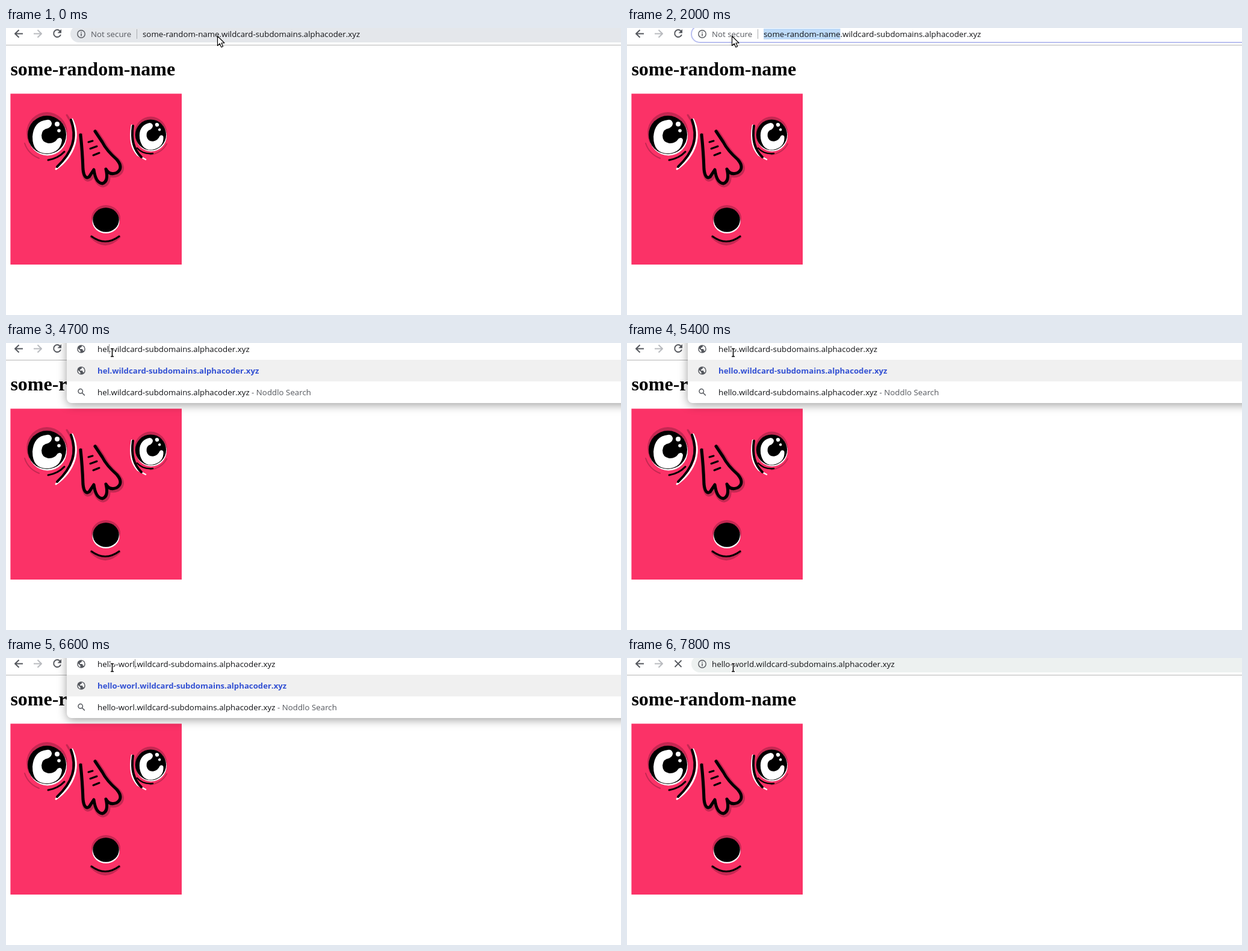
These frames come from a looping animation (1022 by 478 pixels, 8 s). An HTML page with a canvas:

```html
<!DOCTYPE html>
<html lang="en">
<head>
<meta charset="utf-8">
<title>Wildcard subdomains</title>
<style>
html, body { margin: 0; width: 100%; height: 100%; overflow: hidden; background: #fff; }
canvas { display: block; }
</style>
</head>
<body>
<canvas id="stage" width="1022" height="478"></canvas>
<script>
const ctx = document.getElementById('stage').getContext('2d');
const LOOP = 8000;
const UI = '13.32px "Open Sans", "Noto Sans", sans-serif';
const UI_BOLD = 'bold 13.2px "Open Sans", "Noto Sans", sans-serif';
const HEAD = 'bold 32px "Liberation Serif", Times, serif';
const INK = '#101114', GRAY = '#55585e', BLUE = '#3351d3';
const PINK = '#fb3267', SHADE = '#c42852';
const NAME = 'some-random-name';
const DOMAIN = '.wildcard-subdomains.alphacoder.xyz';
const URL_X = 227, ROW_X = 152;

const TYPED = [
  [4300, 'h'], [4400, 'he'], [4700, 'hel'], [4800, 'hell'], [5000, 'hello'],
  [5900, 'hello-'], [6100, 'hello-w'], [6400, 'hello-wor'],
  [6600, 'hello-worl'], [6800, 'hello-world']
];

function text(s, x, y, color, font = UI) {
  ctx.font = font;
  ctx.fillStyle = color;
  ctx.fillText(s, x, y);
  return x + ctx.measureText(s).width;
}

function width(s) {
  ctx.font = UI;
  return ctx.measureText(s).width;
}

function rect(x, y, w, h, color) {
  ctx.fillStyle = color;
  ctx.fillRect(x, y, w, h);
}

function line(d, color, w, cap = 'round') {
  ctx.strokeStyle = color;
  ctx.lineWidth = w;
  ctx.lineCap = cap;
  ctx.lineJoin = 'round';
  ctx.stroke(new Path2D(d));
}

function shape(d, color) {
  ctx.fillStyle = color;
  ctx.fill(new Path2D(d));
}

function oval(x, y, rx, ry, color) {
  ctx.beginPath();
  ctx.ellipse(x, y, rx, ry, 0, 0, 7);
  ctx.fillStyle = color;
  ctx.fill();
}

function at(x, y, draw, scale = 1) {
  ctx.save();
  ctx.translate(x, y);
  ctx.scale(scale, scale);
  draw();
  ctx.restore();
}

// Eyeball centred on the origin; turn rotates the white and the glints
function eye(turn) {
  oval(0, -3, 34, 35, SHADE);
  oval(1, 2, 32, 32.5, '#fff');
  oval(0, 0, 32, 32, '#000');
  ctx.rotate(turn);
  shape('M0 -25 Q-22 -23 -24 3 Q-24 31 0 31 Q22 30 25 9 Q24 3 18 6 Q12 15 2 14 ' +
    'Q-9 12 -9 1 Q-8 -10 2 -11 Q9 -15 8 -20 Q6 -26 0 -25 Z', '#fff');
  oval(17, -18, 4, 4, '#fff');
  oval(20, -7, 2.8, 2.8, '#fff');
}

function face() {
  rect(7.4, 109.4, 284.6, 284.6, PINK);

  line('M31 192 Q37 210 55 217', SHADE, 2);
  line('M101 145 Q112 160 112 185', SHADE, 3);
  at(68, 178, () => eye(0));
  line('M70 220 Q87 217 97 206', '#000', 3);
  line('M110 152 Q120 172 114 194 Q106 219 83 235', '#fff', 3);
  line('M108 153 Q116 175 110 194 Q104 213 85 231', '#000', 4);

  line('M267 193 Q259 208 240 211', SHADE, 2);
  at(240.5, 178, () => eye(-0.2), 0.8);
  line('M209 162 Q203 196 219 212 L232 219', '#fff', 2.5);
  line('M211 163 Q206 197 225 215', '#000', 4);
  line('M218 200 Q228 211 244 209', '#000', 2.5);

  const nose = 'M124 178 Q127 205 128 235 Q130 253 138 248 L146 236 ' +
    'Q149 258 160 259 Q171 256 166 235 Q172 246 184 241 Q196 233 184 219 Q167 204 160 190 L148 172';
  at(1.5, 2, () => line(nose, SHADE, 9));
  shape(nose, PINK);
  line(nose, '#000', 5);
  line('M137 190 L144 188 M140 201 L151 197 M145 212 L155 208', '#000', 3);

  oval(166, 317, 24, 22, SHADE);
  oval(166, 322, 22.5, 20, '#fff');
  oval(166, 319.5, 21.8, 20.2, '#000');
  line('M142 348 Q165 371 188 348', SHADE, 5);
  line('M142 347 Q165 364 188 347', '#000', 3);
}

function arrowIcon(x, dir, color) {
  at(x, 9.5, () => {
    ctx.scale(dir, 1);
    line('M7 0 H-6 M0.5 -6.3 L-6 0 L0.5 6.3', color, 2, 'butt');
  });
}

function reloadIcon() {
  at(85, 9, () => {
    line('M4.6 -4 A6 6 0 1 0 5.9 2', GRAY, 2, 'butt');
    shape('M7 -7 V-0.5 H0.5 Z', GRAY);
  });
}

function stopIcon() {
  line('M79.5 4 L90.5 15 M90.5 4 L79.5 15', GRAY, 1.8, 'butt');
}

function infoIcon() {
  at(125, 10, () => {
    line('M6.2 0 A6.2 6.2 0 1 1 -6.2 0 A6.2 6.2 0 1 1 6.2 0', GRAY, 1.4);
    rect(-0.75, -1, 1.5, 4.5, GRAY);
    rect(-0.75, -3.6, 1.5, 1.5, GRAY);
  });
}

function globe(y, bg) {
  at(125, y, () => {
    oval(0, 0, 6.8, 6.8, GRAY);
    shape('M-5.4 -1 L-1.5 2.5 V5.4 Q-5.6 4 -5.4 -1 Z', bg);
    shape('M1 -5.4 L0.5 -3 L-2 -2 V0 H2 L3 2.8 L4.6 3 Q6.5 -1 3.6 -4.2 Z', bg);
  });
}

function searchIcon() {
  line('M127.4 80.3 A3.7 3.7 0 1 1 120 80.3 A3.7 3.7 0 1 1 127.4 80.3 M126.6 83.2 L130.8 87.4', GRAY, 1.5, 'butt');
}

function caret(x) {
  rect(Math.round(x), 2, 1, 16, '#8a8a8a');
}

function pill(fill, focus) {
  ctx.beginPath();
  ctx.roundRect(107, -4, 1000, 28, 14);
  ctx.fillStyle = fill;
  ctx.fill();
  if (focus) {
    ctx.strokeStyle = '#b9bff0';
    ctx.lineWidth = 2;
    ctx.stroke();
  }
}

// Drag path of the pointer while the name is being selected
function dragPoint(t) {
  const k = Math.min(1, Math.max(0, (Math.floor(t / 100) - 10) / 6));
  const e = k * k * (3 - 2 * k);
  return [353 - 168 * e, 16 - 4 * e];
}

function selectionStart(x) {
  let n = NAME.length;
  while (n > 0 && URL_X + width(NAME.slice(0, n)) > x) n--;
  return URL_X + width(NAME.slice(0, n));
}

function toolbar(t) {
  const focus = t >= 800 && t < 7700;
  const done = t >= 7700;
  rect(0, 28, 1022, 1, '#b5b5b5');
  arrowIcon(21, 1, GRAY);
  arrowIcon(53, -1, '#b9bbbf');
  if (t >= 7800) stopIcon(); else reloadIcon();
  pill(focus ? '#fff' : done ? '#edf1f0' : '#e4e7eb', focus);
  infoIcon();
  if (done) {
    text('hello-world' + DOMAIN, 141, 15, INK);
    return;
  }
  text('Not secure', 141, 15, GRAY);
  rect(217, 2, 1, 16, '#a9acb0');
  const end = URL_X + width(NAME);
  if (t >= 1100) {
    const from = selectionStart(dragPoint(t)[0]);
    rect(from, 1, end - from, 18, '#bddaf8');
  } else if (t >= 800) {
    caret(end);
  }
  text(NAME + DOMAIN, URL_X, 15, INK);
}

function popup(t) {
  const typed = TYPED.filter(s => s[0] <= t).pop()[1];
  const address = typed + DOMAIN;
  ctx.save();
  if (t >= 7700) {
    ctx.globalAlpha = 0.35;
    ctx.beginPath();
    ctx.rect(80, 29, 942, 90);
    ctx.clip();
  } else if (t < 4400) {
    ctx.globalAlpha = 0.97;
  }

  ctx.save();
  ctx.shadowColor = 'rgba(0,0,0,0.38)';
  ctx.shadowBlur = 16;
  ctx.shadowOffsetY = 3;
  ctx.beginPath();
  ctx.roundRect(101, -20, 1000, 120, 8);
  ctx.fillStyle = '#fff';
  ctx.fill();
  ctx.restore();

  rect(101, 28, 921, 36, '#f0f0f0');
  globe(10, '#fff');
  globe(46, '#f0f0f0');
  searchIcon();

  text(address, ROW_X, 15, INK);
  let x = ROW_X;
  if (typed === 'hello-world') {
    x = text('Wildcard subdomains', x, 51, INK);
    x = text(' - ', x, 51, GRAY);
  }
  text(address, x, 51, BLUE, UI_BOLD);
  x = text(address, ROW_X, 87, INK);
  text(' - Noddlo Search', x, 87, GRAY);

  const blink = (t >= 5400 && t < 5900) || t >= 7200;
  if (!blink) caret(ROW_X + width(typed));
  ctx.restore();
}

function arrowPointer(x, y) {
  at(x, y, () => {
    const d = 'M0.5 0.5 V16.5 L4.2 13 L6.8 19 L9.6 17.8 L7 12 H12 Z';
    shape(d, '#fff');
    line(d, '#000', 1.2);
  });
}

function beamPointer(x, y) {
  at(Math.round(x) + 0.5, Math.round(y), () => {
    const d = 'M-2.5 -6.5 H2.5 M0 -6.5 V6.5 M-2.5 6.5 H2.5';
    line(d, '#fff', 3.4, 'square');
    line(d, '#000', 1.5, 'butt');
  });
}

function pointer(t) {
  if (t < 100) arrowPointer(351, 13);
  else if (t < 2000) beamPointer(...dragPoint(t));
  else if (t < 4300) arrowPointer(174, 13);
  else beamPointer(176, 16);
}

function draw(t) {
  rect(0, 0, 1022, 478, '#fff');
  text(NAME, 7.4, 79, '#000', HEAD);
  face();
  toolbar(t);
  if (t >= 4300 && t < 7800) popup(t);
  pointer(t);
}

const start = performance.now();
function frame() {
  draw((performance.now() - start) % LOOP);
  requestAnimationFrame(frame);
}
frame();
</script>
</body>
</html>
```
